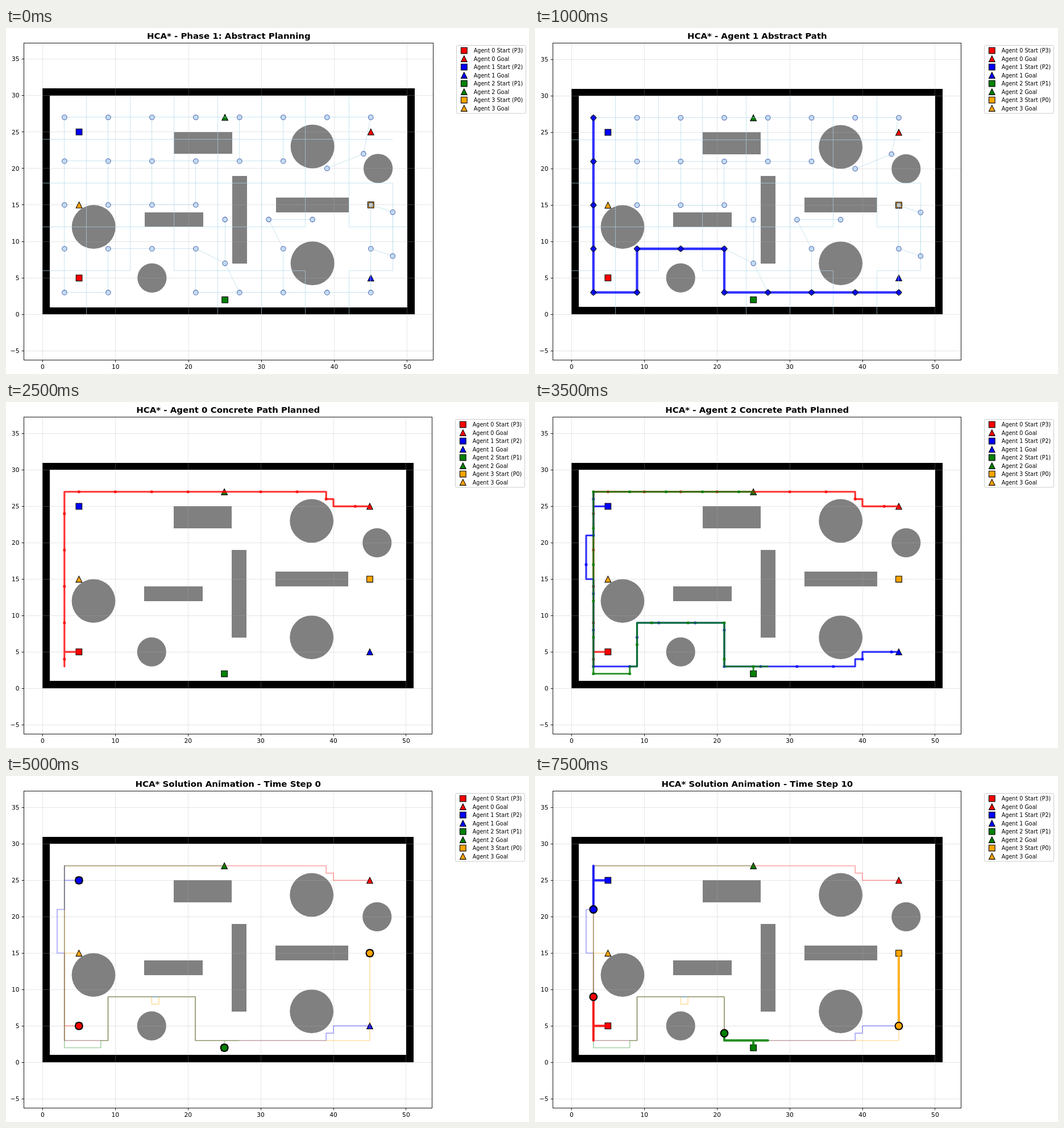
Animation, 920 px wide and 608 px high, one loop 8000 ms. Source, as an HTML page:

```html
<!DOCTYPE html>
<html lang="en">
<head>
<meta charset="utf-8">
<title>Multi-agent path planning</title>
<style>
  html, body { margin: 0; width: 100%; height: 100%; overflow: hidden; background: #fff; }
  svg { display: block; width: 920px; height: 608px; }
  text { font: 10.68px "DejaVu Sans", sans-serif; }
  .title { font-size: 14.95px; font-weight: bold; text-anchor: middle; }
  .legend { font-size: 9.6px; }
  .mid { text-anchor: middle; }
  .end { text-anchor: end; }
  .axis { stroke: #000; stroke-width: .9; fill: none; }
  .grid { stroke: #b0b0b0; opacity: .3; }
  .link { stroke: #add8e6; opacity: .65; fill: none; }
  .route { fill: none; stroke-linecap: square; stroke-linejoin: round; }
  .mark { stroke: #000; stroke-width: 1.07; }
  .node { fill: rgba(179,211,243,.75); stroke: rgba(0,30,130,.65); stroke-width: 1.07; }
</style>
</head>
<body>
<svg id="stage" viewBox="0 0 920 608"></svg>
<script>
const stage = document.getElementById('stage');
const STEP_MS = 500, STATES = 16;
const CELL = 6, COLS = 9, ROWS = 5;

const points = s => s ? s.split(' ').map(p => p.split(',').map(Number)) : [];
const range = (a, b, step = 1) => Array.from({ length: Math.floor((b - a) / step) + 1 }, (_, i) => a + i * step);
const lerp = ([ax, ay], [bx, by], k) => [ax + (bx - ax) * k, ay + (by - ay) * k];

// Obstacles: blocks as x1, y1, x2, y2 and discs as x, y, radius.
const blocks = [[18, 22, 26, 25], [26, 7, 28, 19], [32, 14, 42, 16], [14, 12, 22, 14]];
const discs = [[7, 12, 3], [15, 5, 2], [37, 23, 3], [37, 7, 3], [46, 20, 2]];
const MARGIN = .5;

const blocked = ([x, y]) => x > 48
  || discs.some(([cx, cy, r]) => Math.hypot(x - cx, y - cy) <= r + MARGIN)
  || blocks.some(([x1, y1, x2, y2]) =>
    x >= x1 - MARGIN && x <= x2 + MARGIN && y >= y1 - MARGIN && y <= y2 + MARGIN);
const inSight = (a, b) => !range(0, 40).some(i => blocked(lerp(a, b, i / 40)));

// One node per cluster: its centre, or the nearest free spot around it.
const closed = ['2,0', '6,1', '8,0', '8,3', '8,4'];
function freeSpot(c, r) {
  const x = Math.min(c * CELL + 3, 49), y = r * CELL + 3;
  for (let d = 0; d < 3; d++)
    for (const dx of range(-d, d)) for (const dy of range(-d, d))
      if (!blocked([x + dx, y + dy])) return [x + dx, y + dy];
}
const clusters = {};
for (const c of range(0, COLS - 1)) for (const r of range(0, ROWS - 1)) {
  const key = c + ',' + r;
  if (!closed.includes(key)) clusters[key] = { c, r, at: freeSpot(c, r) };
}
const beside = ({ c, r }, dx, dy) => clusters[(c + dx) + ',' + (r + dy)];
const clusterOf = ([x, y]) => clusters[Math.floor(x / CELL) + ',' + Math.floor(y / CELL)];

// Borders between neighbouring clusters, and edges between nodes that see each other.
const links = [];
for (const k of Object.values(clusters)) {
  const x = k.c * CELL, y = k.r * CELL, right = beside(k, 1, 0), up = beside(k, 0, 1);
  if (right) links.push([[x + CELL, y], [x + CELL, y + CELL]]);
  if (up) links.push([[x, y + CELL], [Math.min(x + CELL, 50), y + CELL]]);
  for (const other of [right, up])
    if (other && inSight(k.at, other.at)) links.push([k.at, other.at]);
}

// Breadth-first search over the clusters.
function abstractPlan(start, goal) {
  const first = clusterOf(start), last = clusterOf(goal);
  const parent = new Map([[first, null]]);
  for (const k of parent.keys())
    for (const [dx, dy] of [[-1, 0], [0, 1], [0, -1], [1, 0]]) {
      const next = beside(k, dx, dy);
      if (next && !parent.has(next) && inSight(k.at, next.at)) parent.set(next, k);
    }
  const plan = [];
  for (let k = last; k; k = parent.get(k)) plan.unshift(k.at);
  return plan;
}

// The plan walked cell by cell, with a lead-in, a detour after one node, and a lead-out.
function walkCells({ start, goal, plan, leadIn, detour, after, leadOut }) {
  const corners = [start, ...points(leadIn)];
  for (const p of plan.slice(0, -1)) {
    corners.push(p);
    if (String(p) === after) corners.push(...points(detour));
  }
  corners.push(...points(leadOut), goal);
  const cells = [start];
  corners.slice(1).forEach((b, i) => {
    const a = corners[i], n = Math.abs(b[0] - a[0]) + Math.abs(b[1] - a[1]);
    for (let k = 1; k <= n; k++) cells.push(lerp(a, b, k / n));
  });
  return cells;
}

const agents = [
  { color: 'red', start: [5, 5], goal: [45, 25], leadIn: '3,5', leadOut: '39,26 40,26 40,25' },
  { color: 'blue', start: [5, 25], goal: [45, 5], leadIn: '3,25',
    after: '3,21', detour: '2,21 2,15', leadOut: '39,4 40,4 40,5' },
  { color: 'green', start: [25, 2], goal: [25, 27], leadIn: '25,3', after: '9,3', detour: '8,3 8,2 3,2' },
  { color: 'orange', start: [45, 15], goal: [5, 15], after: '21,9', detour: '16,9 16,8 15,8', leadOut: '3,15' }
];
for (const a of agents) {
  a.plan = abstractPlan(a.start, a.goal);
  a.cells = walkCells(a);
}

let scale, originY, axisRight;
const X = x => 64.4 + x * scale;
const Y = y => originY - y * scale;
const snap = v => Math.floor(v) + .5;

const line = (x1, y1, x2, y2, cls) => `<line x1="${x1}" y1="${y1}" x2="${x2}" y2="${y2}" class="${cls}"/>`;
const text = (x, y, cls, s) => `<text x="${x}" y="${y}" class="${cls}">${s}</text>`;
const dot = ([x, y], r, attrs) => `<circle cx="${X(x)}" cy="${Y(y)}" r="${r}" ${attrs}/>`;
const route = (pts, color, width, alpha) =>
  `<polyline points="${pts.map(([x, y]) => X(x) + ',' + Y(y)).join(' ')}" class="route" stroke="${color}"
    stroke-width="${width}" opacity="${alpha}"/>`;
const shape = (x, y, d, color, attrs = '') =>
  `<path d="${d}" transform="translate(${x} ${y})" class="mark" fill="${color}" ${attrs}/>`;
function box([x1, y1, x2, y2], fill) {
  const [l, t, r, b] = [X(x1), Y(y2), X(x2), Y(y1)].map(Math.round);
  return `<rect x="${l}" y="${t}" width="${r - l}" height="${b - t}" fill="${fill}"/>`;
}

const SQUARE = 'M-5.34-5.34h10.68v10.68h-10.68z';
const TRIANGLE = 'M0-5.34L5.34 5.34H-5.34z';
const DIAMOND = 'M0-5.28L5.28 0L0 5.28L-5.28 0z';

const world = () => box([0, 0, 51, 31], '#000') + box([1, 1, 50, 30], '#fff')
  + blocks.map(b => box(b, 'gray')).join('')
  + discs.map(([x, y, r]) => dot([x, y], r * scale, 'fill="gray"')).join('');

function axes() {
  let s = '';
  for (const x of range(0, 50, 10)) {
    const px = snap(X(x));
    s += line(px, 26.5, px, 583.5, 'grid') + line(px, 583.5, px, 587.3, 'axis') + text(X(x), 598.8, 'mid', x);
  }
  for (const y of range(-5, 35, 5)) {
    const py = snap(Y(y));
    s += line(31.5, py, axisRight, py, 'grid') + line(27.7, py, 31.5, py, 'axis')
      + text(23.5, Y(y) + 3.9, 'end', y < 0 ? '\u2212' + -y : y);
  }
  return s + `<rect x="31.5" y="26.5" width="${axisRight - 31.5}" height="557" class="axis"/>`;
}

function legend() {
  const left = axisRight + 41;
  let s = `<rect x="${left}" y="30.5" width="122" height="119.5" rx="2" fill="#fff" stroke="#ccc"/>`;
  agents.forEach((a, i) => {
    const y = 39.5 + 29 * i;
    s += shape(left + 13.3, y, SQUARE, a.color) + text(left + 30.3, y + 3.5, 'legend', `Agent ${i} Start (P${3 - i})`)
      + shape(left + 13.3, y + 14.5, TRIANGLE, a.color) + text(left + 30.3, y + 18, 'legend', `Agent ${i} Goal`);
  });
  return s;
}

const endpoints = () => agents.map(({ color, start, goal }) =>
  shape(X(start[0]), Y(start[1]), SQUARE, color) + shape(X(goal[0]), Y(goal[1]), TRIANGLE, color)).join('');

const graph = () => links.map(([a, b]) =>
  line(snap(X(a[0])), snap(Y(a[1])), snap(X(b[0])), snap(Y(b[1])), 'link')).join('')
  + Object.values(clusters).map(k => dot(k.at, 4.27, 'class="node"')).join('');

const abstractPath = a => route(a.plan, a.color, 4.27, .8)
  + a.plan.map(([x, y]) => shape(X(x), Y(y), DIAMOND, a.color, 'opacity=".85"')).join('');

const concretePath = a => route(a.cells, a.color, 3.2, .8)
  + a.cells.filter((_, i) => i % 5 === 0).map(c => dot(c, 2.6, `fill="${a.color}" opacity=".8"`)).join('');

const walk = step => agents.map(a => route(a.cells, a.color, 1.7, .35)).join('')
  + agents.map(a => (step ? route(a.cells.slice(0, step + 1), a.color, 4.27, .8) : '')
    + dot(a.cells[step], 6.4, `fill="${a.color}" stroke="#000" stroke-width="2.1"`)).join('');

function scene(state) {
  if (state === 0) return ['HCA* - Phase 1: Abstract Planning', graph()];
  if (state < 5) return [`HCA* - Agent ${state - 1} Abstract Path`, graph() + abstractPath(agents[state - 1])];
  if (state < 10) {
    const title = state < 9 ? `Agent ${state - 5} Concrete Path Planned` : 'Final Solution';
    return ['HCA* - ' + title, agents.slice(0, state - 4).map(concretePath).join('')];
  }
  const step = 2 * (state - 10);
  return ['HCA* Solution Animation - Time Step ' + step, walk(step)];
}

// The opening view is a touch wider than the rest.
function draw(state) {
  [scale, originY, axisRight] = state ? [12.79, 503.1, 749.5] : [12.83, 503.4, 751.5];
  const [title, content] = scene(state);
  stage.innerHTML = world() + axes() + endpoints() + content + legend()
    + text((31.5 + axisRight) / 2 + .3, 19.3, 'title', title);
}

let shown = -1;
const begin = performance.now();
function tick() {
  const state = Math.floor((performance.now() - begin) / STEP_MS) % STATES;
  if (state !== shown) draw(shown = state);
  requestAnimationFrame(tick);
}
tick();
</script>
</body>
</html>
```
